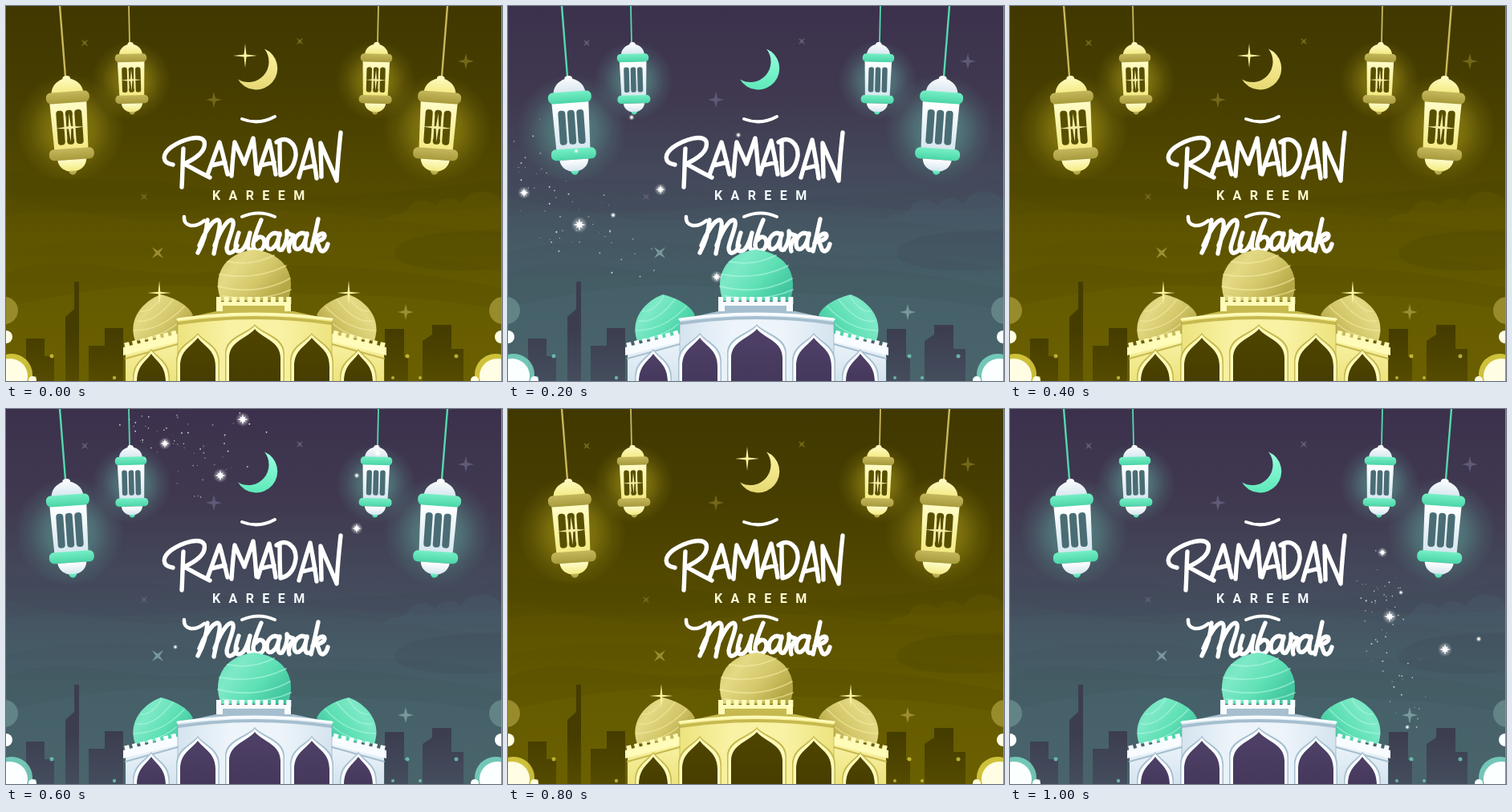
Write an HTML page that moves like this. It is 618x468 px and loops after 1200 ms.

```html
<!DOCTYPE html>
<html lang="en">
<head>
<meta charset="utf-8">
<title>Ramadan Kareem Mubarak</title>
<style>
html, body { margin: 0; width: 100%; height: 100%; overflow: hidden; }
svg { display: block; width: 100vw; height: 100vh; }
.gold {
  --sky0: #403800; --sky1: #473e00; --sky2: #554b00; --sky3: #645a00; --sky4: #6b6000;
  --wave: #817506; --shade: #352d00; --city: #453c00; --faint: #746719; --star: #9b8d30;
  --moon0: #fff3a1; --moon1: #e6d873; --cord: #c9b95a; --glow: #f2e02c; --text: #fffbd4;
  --body0: #fffcc8; --body1: #f3e97f; --ring0: #c4b75c; --ring1: #a89b3c; --slot: #594f00;
  --dome0: #e4d984; --dome1: #d3c76a; --dome2: #b4a745; --stripe: #f6eda4;
  --wall0: #f9f2a4; --wall1: #ede37f; --wall2: #c6b94f; --trim: #fffbb8; --edge: #a39635;
  --door0: #463d00; --door1: #4f4500; --puff: #fffde4; --rim: #f0e24e; --orb: #988b2c;
}
.mint {
  --sky0: #3c314d; --sky1: #403950; --sky2: #444d5d; --sky3: #456068; --sky4: #4a646c;
  --wave: #587d80; --shade: #373448; --city: #3c3e50; --faint: #5f5a78; --star: #78989b;
  --moon0: #98ffe0; --moon1: #5ee9b9; --cord: #55d9ae; --glow: #75f2cf; --text: #f4fbff;
  --body0: #ffffff; --body1: #d4e5ee; --ring0: #76efc5; --ring1: #4bd5a8; --slot: #4a6d75;
  --dome0: #7ee9c7; --dome1: #5fe0b5; --dome2: #43c7a0; --stripe: #b1f8e2;
  --wall0: #edf4fa; --wall1: #d5e4ef; --wall2: #a6bfcf; --trim: #f8fcff; --edge: #7693a8;
  --door0: #44385b; --door1: #4f4067; --puff: #fbffff; --rim: #81e8d1; --orb: #638487;
}
.mint .flare { display: none; }
</style>
</head>
<body>
<svg id="stage" class="gold" viewBox="0 0 618 468" preserveAspectRatio="none" role="img"></svg>
<script>
const stage = document.getElementById('stage');

const path = (d, fill, extra = '') => `<path d="${d}" fill="${fill}" ${extra}/>`;
const line = (d, color, width, extra = '') =>
  path(d, 'none', `stroke="${color}" stroke-width="${width}" stroke-linecap="round" stroke-linejoin="round" ${extra}`);
const rect = (x, y, w, h, fill, r = 0) =>
  `<rect x="${x}" y="${y}" width="${w}" height="${h}" rx="${r}" fill="${fill}"/>`;
const dot = (x, y, r, fill, extra = '') =>
  `<circle cx="${x}" cy="${y}" r="${r}" fill="${fill}" ${extra}/>`;
const group = (body, attrs = '') => `<g ${attrs}>${body}</g>`;
const mirror = (axis, body) => body + group(body, `transform="translate(${axis * 2}) scale(-1 1)"`);

// Four-pointed star; waist sets how thick its rays are.
function star(x, y, r, fill, waist = .2, turn = 0) {
  const w = r * waist;
  return path(`M0 ${-r}L${w} ${-w} ${r} 0 ${w} ${w} 0 ${r} ${-w} ${w} ${-r} 0 ${-w} ${-w}Z`, fill,
    `transform="translate(${x} ${y}) rotate(${turn})"`);
}

function gradient(id, stops, dir = 'x2="0" y2="1"') {
  const body = stops.map((name, i) =>
    `<stop offset="${i / (stops.length - 1)}" style="stop-color:var(--${name})"/>`).join('');
  return `<linearGradient id="${id}" ${dir}>${body}</linearGradient>`;
}

function defs() {
  const glow = [[0, .42], [.45, .26], [.75, .09], [1, 0]].map(([at, o]) =>
    `<stop offset="${at}" style="stop-color:var(--glow)" stop-opacity="${o}"/>`).join('');
  return `<defs>
    ${gradient('sky', ['sky0', 'sky1', 'sky2', 'sky3', 'sky4'])}
    ${gradient('city', ['city', 'city', 'sky2'])}
    ${gradient('moon', ['moon0', 'moon1'])}
    ${gradient('body', ['body0', 'body1'])}
    ${gradient('ring', ['ring0', 'ring1'])}
    ${gradient('dome', ['dome1', 'dome0', 'dome1', 'dome2'], 'x2="1" y2=".6"')}
    ${gradient('wall', ['wall0', 'wall1'])}
    ${gradient('front', ['wall1', 'wall0', 'wall0', 'wall1'], 'x2="1" y2="0"')}
    ${gradient('door', ['door1', 'door0'])}
    <radialGradient id="glow">${glow}</radialGradient>
    <radialGradient id="spark"><stop offset="0" stop-color="#fff" stop-opacity=".7"/>
      <stop offset="1" stop-color="#fff" stop-opacity="0"/></radialGradient>
  </defs>`;
}

function sky() {
  const wave = (d, color, o) => path(d, `var(--${color})`, `opacity="${o}"`);
  return rect(0, 0, 618, 468, 'url(#sky)') +
    wave('M0 205C80 226 150 208 230 225S400 245 618 216V250C480 268 390 235 270 249S90 262 0 239Z', 'shade', .07) +
    wave('M0 262C90 243 150 280 250 263S450 263 618 285V330C500 300 380 318 280 304S100 285 0 307Z', 'wave', .07) +
    wave('M0 334C80 300 160 345 260 331S470 323 618 352V380C480 352 390 366 280 353S80 358 0 376Z', 'shade', .08) +
    wave('M618 283C540 276 484 291 484 309S550 334 618 328Z', 'shade', .12) +
    wave('M470 268C480 256 495 263 500 254C508 237 530 242 535 249C545 236 562 239 567 247C580 225 606 229 618 244V278C570 285 520 268 470 268Z', 'wave', .13) +
    [[98, 46, 6, 45], [366, 44, 6, 45], [573, 69, 10, 0], [259, 117, 10, 0], [172, 238, 6, 45]]
      .map(([x, y, r, a]) => star(x, y, r, 'var(--faint)', .2, a)).join('') +
    star(189, 308, 10, 'var(--star)', .18, 45) + star(498, 382, 10, 'var(--star)', .2);
}

function city() {
  return path('M25 468V415H48V437H60V468ZM74 468V388L85 378V344H91V468ZM103 468V424H123V402H146V468Z' +
    'M472 468V403H496V438H501V468ZM519 468V418L531 410V398H555V428H570V468Z', 'url(#city)') +
    [[57, 437, 2.5], [36, 464, 2], [135, 464, 2.2], [500, 437, 2.5], [561, 437, 2.5], [516, 464, 2], [482, 464, 2]]
      .map(([x, y, r]) => dot(x, y, r, 'var(--rim)', 'opacity=".65"')).join('');
}

function lantern() {
  const slots = [-16, -4.5, 7].map(x => rect(x, 43, 9, 43, 'var(--slot)', 4)).join('');
  return dot(0, 66, 68, 'url(#glow)') +
    path('M-20 23C-20 12 -12 6 -5 4Q-5 0 0 0T5 4C12 6 20 12 20 23Z', 'url(#body)') +
    path('M-23 33H23L21 95H-21Z', 'url(#body)') + slots +
    rect(-27, 20, 54, 14, 'url(#ring)', 6) +
    rect(-28, 91, 56, 14, 'url(#ring)', 6) +
    path('M-18 105H18C17 115 8 120 0 120S-17 115 -18 105Z', 'url(#body)') +
    path('M-5 119H5Q4 124 0 124T-5 119Z', 'url(#ring)') +
    group(star(0, 65, 18, 'var(--stripe)', .09) +
      line('M-5 50V79M5 50V79', 'var(--stripe)', 1.8), 'class="flare"');
}

function lanterns() {
  return mirror(308.5,
    line('M67 0L74 88', 'var(--cord)', 2.4) +
    group(lantern(), 'transform="translate(75 87) rotate(-4)"') +
    line('M153 0L154 46', 'var(--cord)', 1.8) +
    group(lantern(), 'transform="translate(155 45) rotate(-1.5) scale(.73)"'));
}

function moon() {
  return path('M322 53.5A26.5 26.5 0 1 1 289 91.5A25.6 25.6 0 0 0 322 53.5Z', 'url(#moon)') +
    group(star(298, 62, 15, 'var(--moon0)', .1), 'class="flare"');
}

function lettering() {
  const ramadan = [
    'M208 198C194 196 194 185 206 176C221 166 242 160 247 169C250 181 235 191 222 197C233 203 243 209 254 214',
    'M221 178C220 195 220 210 219 226',
    'M251 211C256 197 261 183 266 170C270 183 273 197 276 210M256 199L273 195',
    'M281 212C282 197 283 184 285 170L297 197L308 165C310 180 311 195 312 209',
    'M314 210C318 196 323 182 328 168C331 182 334 196 336 210M318 199L334 195',
    'M341 169C341 183 341 197 342 211M337 170C350 161 362 172 361 187C359 201 352 209 342 211',
    'M365 214C369 199 374 183 379 167C382 183 385 199 387 215M369 203L385 199',
    'M393 213C393 199 392 185 392 171C399 188 406 203 412 218C413 197 415 177 417 158'
  ].join('');
  const a = 'M341 286C333 279 325 288 325 297C325 308 337 306 341 284C338 296 337 307 344 304';
  const mubarak = [
    'M251 267C250 282 245 297 239 308',
    'M241 299C248 282 257 267 264 267C270 269 262 292 259 309',
    'M260 299C266 282 275 267 281 267C288 269 276 292 275 302C275 312 284 309 288 299',
    'M290 283C287 292 283 306 290 306C297 306 301 294 304 283C301 295 299 306 306 304',
    'M318 267C313 279 308 291 308 299C309 309 321 307 322 296C322 287 315 286 311 292',
    a,
    'M344 304C348 298 351 290 350 281C351 287 357 284 359 287C354 293 351 300 353 306',
    'M389 266C386 280 383 294 380 306M382 296C388 284 397 281 397 287C396 292 390 293 386 294C391 296 389 307 395 306C398 305 400 301 401 297'
  ].join('');
  return line('M294 141Q315 149 335 138', '#fff', 4) +
    line(ramadan, '#fff', 5.4) +
    `<text x="257" y="242" fill="var(--text)" font-family="Roboto, Arial, sans-serif" font-weight="700" font-size="16" letter-spacing="10.4">KAREEM</text>` +
    line('M294 263Q315 254 335 263', '#fff', 4) +
    line('M222 263C221 275 234 278 247 268', '#fff', 4.5) +
    line(mubarak, '#fff', 5.4) +
    group(line(a, '#fff', 5.4), 'transform="translate(34)"');
}

function arch(x, top, half) {
  const shape = (w, t) => `M${x - w} 470V${t + 36}C${x - w} ${t + 15} ${x - 8} ${t + 11} ${x} ${t}` +
    `C${x + 8} ${t + 11} ${x + w} ${t + 15} ${x + w} ${t + 36}V470Z`;
  return path(shape(half + 5, top - 6), 'var(--wall2)') +
    path(shape(half + 3.5, top - 4), 'var(--trim)') +
    path(shape(half, top), 'url(#door)');
}

function mosque() {
  const side = path('M161 418C151 389 172 368 193 360C212 365 228 374 233 386L214 397V412Z', 'url(#dome)') +
    line('M163 393Q184 397 208 366M159 405Q194 405 222 375M168 381Q182 382 194 362M172 416Q200 408 212 397', 'var(--stripe)', 1.4, 'opacity=".6"') +
    path('M149 434L214 414V468H149Z', 'url(#wall)') +
    line('M149 440L214 422', 'var(--wall2)', 2) +
    path('M146 426L214 409V419L146 436Z', 'var(--trim)') +
    line('M148 424L213 408', 'var(--trim)', 7, 'stroke-dasharray="6 4" style="stroke-linecap:butt"') +
    arch(181, 434, 18);
  const row = Array.from({ length: 10 }, (_, i) => rect(262 + i * 9.7, 363, 6, 9, 'var(--trim)')).join('');
  return mirror(310, side) +
    path('M268 368C257 340 268 309 309 304C351 309 362 340 351 368Z', 'url(#dome)') +
    line('M276 319Q307 325 334 311M266 335Q311 343 349 324M264 350Q314 362 354 340M270 362Q320 370 355 354', 'var(--stripe)', 1.8, 'opacity=".6"') +
    row + rect(262, 369, 93, 14, 'var(--trim)') + rect(270, 374, 77, 8, 'var(--wall2)') +
    path('M216 391L262 381H358L404 391Z', 'var(--wall2)') +
    path('M214 391Q310 377 406 391V468H214Z', 'url(#front)') +
    line('M214 391Q310 377 406 391', 'var(--trim)', 3) +
    line('M215 396Q310 382 405 396', 'var(--wall2)', 4) +
    line('M214 395V468M406 395V468', 'var(--edge)', 1, 'opacity=".5"') +
    mirror(310, arch(239, 414, 22)) + arch(310, 403, 32) +
    group(star(191, 358, 15, 'var(--moon0)', .09) + star(427, 358, 15, 'var(--moon0)', .09), 'class="flare"');
}

function puffs() {
  return mirror(308.5,
    dot(-2, 380, 17, 'var(--orb)') +
    dot(0, 413, 8, 'var(--puff)') +
    dot(7, 460, 26, 'var(--rim)', 'opacity=".75"') +
    dot(5, 462, 22, 'var(--puff)') +
    dot(33, 467, 5, 'var(--puff)'));
}

function random(seed) {
  return () => (seed = (seed * 16807) % 2147483647) / 2147483647;
}

// Grains scattered around a bent line, plus a few bright stars.
function dust(seed, [x0, y0, bx, by, x1, y1], spread, stars) {
  const rnd = random(seed);
  let out = '';
  for (let i = 0; i < 65; i++) {
    const t = rnd(), u = 1 - t;
    const off = () => (rnd() + rnd() - 1) * spread;
    const x = u * u * x0 + 2 * u * t * bx + t * t * x1 + off();
    const y = u * u * y0 + 2 * u * t * by + t * t * y1 + off();
    out += dot(x.toFixed(1), y.toFixed(1), (.4 + rnd() * .7).toFixed(2), '#fff', `opacity="${(.3 + rnd() * .6).toFixed(2)}"`);
  }
  for (const [x, y, r] of stars) {
    out += dot(x, y, r * 1.3, 'url(#spark)') + star(x, y, r, '#fff', .2) +
      star(x, y, r * .75, '#fff', .25, 45) + dot(x, y, r * .4, '#fff');
  }
  return group(out, 'class="dust"');
}

const bursts =
  dust(71, [8, 150, 20, 270, 170, 312], 48,
    [[20, 233, 6], [89, 273, 8], [190, 229, 6], [260, 338, 6], [131, 261, 3], [154, 139, 3], [287, 161, 3], [85, 181, 2.5]]) +
  dust(29, [170, 10, 210, 60, 285, 65], 62,
    [[198, 43, 6], [267, 83, 7], [295, 13, 7], [437, 149, 6], [463, 55, 4], [437, 83, 3], [211, 297, 2.5], [543, 90, 3]]) +
  dust(53, [455, 195, 470, 270, 500, 390], 40,
    [[464, 179, 5], [473, 259, 7], [542, 300, 7], [584, 287, 3], [495, 397, 2.5], [487, 229, 2.5]]);

stage.setAttribute('aria-label', 'Ramadan Kareem Mubarak');
stage.innerHTML = defs() + sky() + city() + lanterns() + moon() + puffs() +
  lettering() + mosque() + bursts + rect(617, 0, 1, 468, 'var(--edge)');

const layers = [...stage.querySelectorAll('.dust')];
const start = performance.now();

function draw() {
  const step = Math.floor((performance.now() - start) % 1200 / 200);
  stage.setAttribute('class', step % 2 ? 'mint' : 'gold');
  layers.forEach((layer, i) => { layer.style.display = step === i * 2 + 1 ? '' : 'none'; });
  requestAnimationFrame(draw);
}
draw();
</script>
</body>
</html>
```
